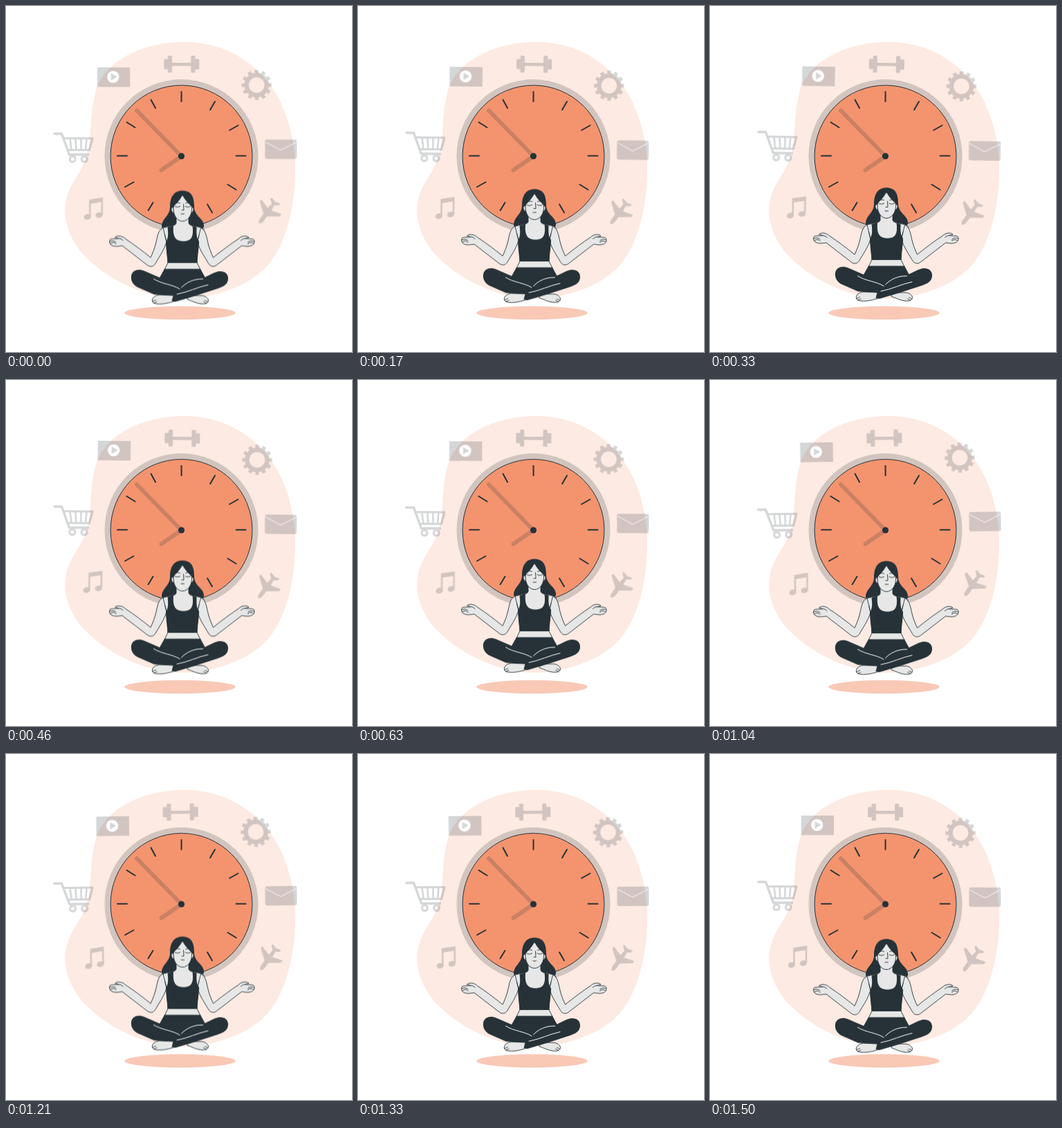
These frames come from a looping animation (500x500 px, 1540 ms). An HTML page:

```html
<!DOCTYPE html>
<html lang="en">
<head>
<meta charset="utf-8">
<title>Meditation</title>
<style>
  html, body { margin: 0; height: 100%; overflow: hidden; background: #fff; }
  svg { display: block; width: 100vw; height: 100vh; }

  .float, .sway { animation: float 1540ms linear -50ms infinite; }
  .sway { animation-name: sway; transform-origin: 245px 193px; }
  @keyframes float { 50% { transform: translateY(-10px); } }
  @keyframes sway {
    0%, 100% { transform: rotate(0deg); }
    25% { transform: rotate(1deg); }
    75% { transform: rotate(-1deg); }
  }

  .dark { fill: #263238; }
  .orange { fill: #f4946e; }
  .faint { opacity: .2; }
  .line { fill: none; stroke: #263238; stroke-linecap: round; stroke-linejoin: round; }
  .skin { fill: #e6e7e6; stroke: #263238; stroke-width: .9; stroke-linejoin: round; }
  .seam { fill: none; stroke: #fff; stroke-width: 1; stroke-linecap: round; }
</style>
</head>
<body>
<svg viewBox="0 0 500 500">
  <path class="orange faint" d="M258 52C318 52 366 84 392 130C412 166 420 212 418 246C416 296 404 345 378 375C350 406 300 422 255 423C205 423 144 396 110 357C90 334 83 306 86 286C90 254 114 238 119 208C124 180 121 152 130 122C144 78 198 52 258 52Z"/>
  <ellipse class="orange" opacity=".5" cx="251.5" cy="443.5" rx="80" ry="9.7"/>

  <!-- clock -->
  <circle class="dark faint" cx="253.5" cy="217" r="111"/>
  <circle class="orange" cx="253.5" cy="217" r="102.4" stroke="#263238"/>
  <path class="line" stroke-width="2" d="M253.5 124V138M302 138L295 150M335.5 172.5L323 179.5M332.500 216.500H346.500M320.500 258L332.500 265.500M291 286.500L298 298.500M212.500 284L205.500 295.500M184.500 254.500L172 261.500M161 216.500H175M174.500 168L186.500 175.500M209.500 135.500L216 147.500"/>
  <path class="line faint" stroke-width="6" d="M189 151L253.500 217L224.500 237"/>
  <circle class="dark" cx="253.500" cy="217" r="4.600"/>

  <!-- icons -->
  <g class="sway">
    <g class="dark faint">
      <path d="M131.600 89H179V117.200H131.600Z"/>

      <rect x="228" y="76.500" width="6" height="15" rx="1.500"/>
      <rect x="233.600" y="71.800" width="6.200" height="24.500" rx="1.500"/>
      <rect x="239" y="82" width="29" height="4.600"/>
      <rect x="267" y="71.800" width="6.200" height="24.500" rx="1.500"/>
      <rect x="272.800" y="76.500" width="6.200" height="15" rx="1.500"/>

      <g class="line" transform="rotate(-8 362 114)" stroke-linecap="butt" style="stroke-linecap:butt">
        <circle cx="362" cy="114" r="14.600" stroke-width="6.600"/>
        <circle cx="362" cy="114" r="19.400" stroke-width="4.600" pathLength="24" stroke-dasharray="1 1"/>
      </g>

      <rect x="374.300" y="192.800" width="46" height="28" rx="3"/>

      <g class="line">
        <path stroke-width="3.400" d="M70 185H80.500L91.500 215H118.500"/>
        <path stroke-width="3" d="M83.500 191.500H125L120.500 208.500H89.500"/>
        <path stroke-width="2.600" d="M92.500 192L94.500 208M100.500 192L101.500 208M108.500 192V208M116.500 192L115 208"/>
        <circle cx="96.200" cy="221.500" r="4" stroke-width="3"/>
        <circle cx="113.300" cy="221.500" r="4" stroke-width="3"/>
      </g>

      <path d="M120.300 280L140.300 277V302H137.800V283.500L122.800 286V305H120.300Z"/>
      <ellipse cx="118" cy="305" rx="5.200" ry="4" transform="rotate(-14 118 305)"/>
      <ellipse cx="135" cy="302.300" rx="5.200" ry="4" transform="rotate(-14 135 302.300)"/>

      <path transform="translate(378.500 297) rotate(216)" d="M0 -21C2.500 -20 3.200 -17 3.200 -14V-6L18 5V9L3.200 4.500L2.200 13L7.500 17V20L0 18L-7.500 20V17L-2.200 13L-3.200 4.500L-18 9V5L-3.200 -6V-14C-3.200 -17 -2.500 -20 0 -21Z"/>
    </g>
    <circle cx="154.600" cy="102.600" r="8.700" fill="#fff"/>
    <path class="dark faint" d="M151.500 97.300L160.300 102.600L151.500 107.900Z"/>
    <path class="seam" opacity=".8" d="M375.500 196.500L397 208L419.500 196.500"/>
  </g>

  <!-- woman -->
  <g class="float"><g transform="translate(0 .6)">
    <path class="dark" d="M255 267C242 267 237 277 237 290C237 304 226 306 225 318C225 326 238 327 255 325C272 327 287 326 286 317C285 306 272 304 272 290C272 276 268 267 255 267Z"/>

    <path class="skin" d="M246 303V314C244 319 234 318 226 321C221 325 224 334 232 341L234 371L229 381H281L276 371L278 341C286 334 289 325 284 321C276 318 266 319 264 314V303Z"/>

    <g id="arm">
      <path class="skin" d="M227 320.500C220 324 219 332 217 341C215 350 212 357 209 363.500C196 353 184 344 172.500 336.500C168 331.500 160 331.500 157.500 334.500L163 336C158 337 152 335.500 150 338C149 341 149.500 344 153 346C158 348.500 163 347 168 346.500L203 373.500C208 378 213 377 216 372C221 363 228 354 232 341Z"/>
      <path class="line" stroke-width=".9" d="M150 340.500C153 338.500 157 339.500 159 341.500M151 343.500C154 341 157 341.500 159 344M163 336C166 336 168 337.500 169 339M232 341L229.500 331"/>
    </g>
    <use href="#arm" transform="matrix(-1 0 0 1 508.500 0)"/>

    <path class="dark" d="M233.500 320L242 317.500C241 331 243 340 256.500 340C270 340 271 331 269.500 317.500L275.500 320C275 332 276 337 279 340C279 352 276 362 276.500 371.500H233.500C233 360 231 351 231 341C234 337 235 331 233.500 320Z"/>

    <path class="skin" d="M244 418.500L222 417.500C217 418 213 420 211.500 424C210.500 428 213 430 218 430.500C227 431.500 236 429 244 426.500Z"/>
    <path class="skin" d="M262 422L270 418.500L283 418.500C288 419 292 422 292.500 425.500C292 430 288 431 282 430.500C275 430 268 426 262 424Z"/>
    <path class="line" stroke-width=".8" d="M212 427L216.500 425M213.500 429.500L218 427.500M292 428L287.500 425.500M290 430L285.500 427.500"/>

    <path class="dark" d="M229 380H281L287.500 392L301 385.500C312 380.500 321 385 321 393.500C321 402 315 405.500 306 408.500L272 419.500L245 427.500L239.500 426.500L241.500 418.500L214 417L190 406.500C183 403 180 396 181 390C183 381 192 379.500 200 383L222 392.500Z"/>
    <path class="seam" d="M213.500 394.500C225 402 240 402 251 409M284.500 394.500C271 394 260 400 253.500 407M292 403C277 406 262 414 247 416.500"/>

    <path class="skin" stroke-width=".6" d="M242 291C238 290 237.500 298 243 299ZM268 291C272 290 272.500 298 267 299Z"/>
    <path class="skin" d="M255 274C246 277 241.500 284 242 294C242.500 304 248 311 255 311C262 311 268 304 268.500 294C269 284 264 277 255 274Z"/>
    <path class="dark" d="M255 273C252 281 246 285 242 290.500L239 291C238 278 245 271 255 271C265 271 272 278 271 291L268.500 290.500C264 285 258 281 255 273Z"/>
    <path class="line" stroke-width=".9" d="M244 289.500C246 291 249.500 291 251.500 289.500M259 289.500C261 291 264.500 291 266.500 289.500M245 285.500C247 284 249.500 284 251.500 285M259.500 285C261.500 284 264 284 266 285.500M256.500 286.500L257 295H254M253 300.500H257.500"/>
  </g></g>
</svg>
</body>
</html>
```
